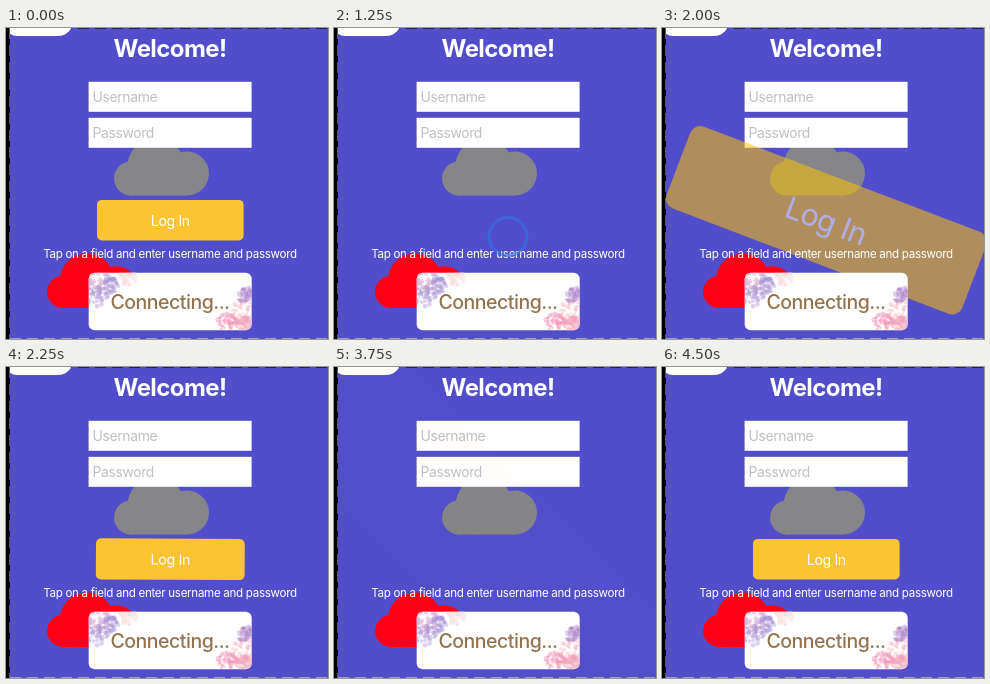
These frames come from a looping animation (322x311 px, 5750 ms). An HTML page:

```html
<!DOCTYPE html>
<html lang="en">
<head>
<meta charset="utf-8">
<title>Login screen</title>
<style>
  html, body { margin: 0; width: 100%; height: 100%; overflow: hidden; background: #000; }
  svg { display: block; width: 322px; height: 311px; }
  text { font-family: Inter, Roboto, sans-serif; letter-spacing: -.025em; fill: #fff; }
  .middle { text-anchor: middle; }
  .hint { font-size: 13.9px; fill: #bfbfc4; }
  .dashed { stroke-dasharray: 11 6; }
</style>
</head>
<body>
<svg viewBox="0 0 322 311">
  <defs>
    <clipPath id="screen"><rect x="4" width="318" height="311"/></clipPath>
    <clipPath id="card"><rect x="82.7" y="244.8" width="163" height="57.5" rx="6"/></clipPath>
    <g id="cloud">
      <circle cx="17" cy="40" r="17"/>
      <circle cx="42" cy="28" r="28.5"/>
      <circle cx="73" cy="35" r="22"/>
      <rect x="17" y="30" width="56" height="27"/>
    </g>
    <rect id="field" x="82.6" width="163" height="30" fill="#fff"/>
  </defs>

  <g clip-path="url(#screen)">
    <rect width="322" height="311" fill="#524ecb"/>
    <path class="dashed" d="M4 .5H322" stroke="#25234f"/>
    <path class="dashed" d="M4 310.5H322" stroke="#a3a1bf"/>
    <use href="#cloud" fill="#fff" transform="translate(-1 -33) scale(.72)"/>
    <use href="#cloud" fill="#85858a" transform="translate(108 110.5)"/>
    <use href="#cloud" fill="#ff0016" transform="translate(41 225.8) scale(.95)"/>

    <text class="middle" x="164" y="28.5" font-size="24" font-weight="700">Welcome!</text>
    <use href="#field" y="53.8"/>
    <use href="#field" y="89.8"/>
    <text class="hint" x="86.5" y="74">Username</text>
    <text class="hint" x="86.5" y="110">Password</text>

    <g id="button">
      <rect x="-73.3" y="-20.3" width="146.6" height="40.6" rx="5"/>
      <text class="middle" y="5.3" font-size="14.1">Log In</text>
    </g>

    <text class="middle" x="164" y="230" font-size="11.57">Tap on a field and enter username and password</text>

    <g clip-path="url(#card)">
      <rect x="82" y="244" width="165" height="60" fill="#fff"/>
      <g id="paint"></g>
      <text class="middle" x="164" y="281" font-size="19.5" font-weight="500" style="fill:#967350">Connecting...</text>
    </g>
  </g>

  <path class="dashed" d="M3.5 0V311" stroke="#55546a"/>
  <circle id="pointer" fill="none" stroke="#2d7de1" stroke-opacity=".55" stroke-width="3"/>
</svg>
<script>
  const LOOP = 5750, FRAME = 250;
  const HOLD = 460, RETURN = 580;   // ms hidden after a tap, ms to fly back
  const button = document.getElementById('button');
  const pointer = document.getElementById('pointer');

  // The pointer moves one point per frame and presses on the last.
  const taps = [
    { enter: 250, tap: 1236, leave: 1500,
      path: [[211, 247], [211, 247], [197, 200], [174, 193], [174, 208.5]] },
    { enter: 2750, tap: 3273, leave: 3750,
      path: [[167, 187], [160, 190], [161.5, 213.5]] },
  ];

  const clamp = v => Math.min(1, Math.max(0, v));
  const smooth = u => u * u * (3 - 2 * u);

  function setAttributes(node, attributes) {
    for (const name in attributes) node.setAttribute(name, attributes[name]);
  }

  // Watercolour: seeded clusters of translucent dots.
  let seed = 7;
  const random = () => (seed = seed * 16807 % 2147483647) / 2147483647;

  function splash(x, y, size, color) {
    for (let i = 0; i < 50; i++) {
      const angle = random() * 2 * Math.PI;
      const distance = size * Math.sqrt(random());
      const dot = document.createElementNS('http://www.w3.org/2000/svg', 'circle');
      setAttributes(dot, {
        cx: x + distance * Math.cos(angle), cy: y + distance * Math.sin(angle),
        r: .8 + 2 * random(), fill: color, opacity: .4,
      });
      document.getElementById('paint').append(dot);
    }
  }
  splash(122, 249, 9, '#f8dbdc');
  splash(92, 252, 11, '#d3a9d0');
  splash(91, 268, 11, '#a88fd2');
  splash(105, 257, 8, '#a58fd4');
  splash(238, 285, 13, '#f5b4bd');
  splash(221, 294, 10, '#f08fb4');
  splash(239, 267, 8, '#ad86c8');
  splash(238, 296, 8, '#f0a0b8');

  // 0 = at rest, 1 = blown up and invisible
  function burstAt(t) {
    const last = taps.findLast(({ tap }) => tap <= t);
    return last ? 1 - smooth(clamp((t - last.tap - HOLD) / RETURN)) : 0;
  }

  function draw(now) {
    const t = Math.floor(now % LOOP / FRAME) * FRAME;
    const burst = burstAt(t);
    setAttributes(button, {
      transform: `translate(164.3 192.2) rotate(${45 * burst}) scale(${1 + 2.5 * burst})`,
      opacity: 1 - burst,
      fill: `rgb(255, 196, ${Math.max(0, Math.round(50 - 110 * burst))})`,
    });

    const active = taps.find(({ enter, leave }) => enter <= t && t < leave);
    pointer.setAttribute('visibility', active ? 'visible' : 'hidden');
    if (!active) return;
    const end = active.path.length - 1;
    const index = Math.min(end, (t - active.enter) / FRAME);
    const [cx, cy] = active.path[index];
    setAttributes(pointer, { cx, cy, r: index === end ? 19 : 14.5 });
  }

  const origin = performance.now();
  function tick() {
    draw(performance.now() - origin);
    requestAnimationFrame(tick);
  }
  tick();
</script>
</body>
</html>
```
